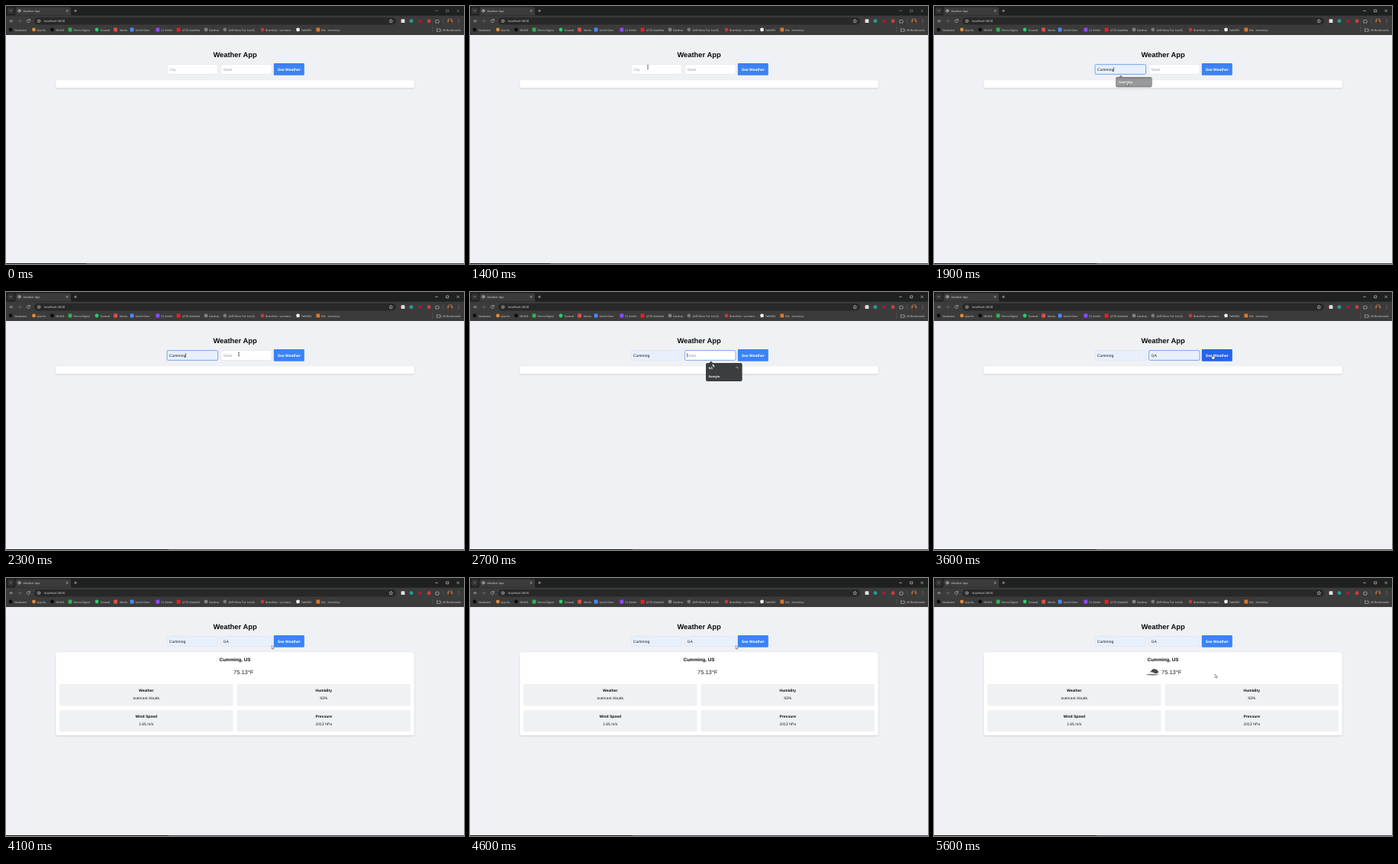
Write an HTML page that moves like this. It is 600 px wide and 338 px high and loops after 5700 ms.

```html
<!DOCTYPE html>
<html lang="en">
<head>
<meta charset="utf-8">
<title>Weather App</title>
<style>
  html, body { margin: 0; width: 100%; height: 100%; overflow: hidden; background: #eff1f4; }
  svg { display: block; width: 600px; height: 338px; text-rendering: geometricPrecision; }
  text { font: 5px "Liberation Sans", Arial, sans-serif; fill: #1b1c1e; }
  .ui text { font: 3.6px "Open Sans", "Noto Sans", sans-serif; fill: #dcdcdc; }
  .mid { text-anchor: middle; }
  .b { font-weight: 700; fill: #0b0b0c; }
  .line { fill: none; stroke: #c9c9c9; stroke-width: .6; stroke-linecap: round; stroke-linejoin: round; }
  .hint { fill: #9ca3af; }
  .card { fill: #fff; filter: drop-shadow(0 1px 1px rgba(0, 0, 0, .13)); }
  .menu text { fill: #f1f1f1; font: 700 3.8px "Open Sans", "Noto Sans", sans-serif; }
</style>
</head>
<body>
<svg viewBox="0 0 600 338">
  <rect width="600" height="338" fill="#eff1f4"/>

  <g class="ui">
    <rect width="600" height="38" fill="#3b3b3b"/>
    <rect width="600" height="12.6" fill="#1f2020"/>
    <rect x="1.7" y="1.8" width="9" height="8.6" rx="2.6" fill="#333"/>
    <path d="M10 12.6q2.5 0 2.5-2.5V4q0-2.5 2.5-2.5h67.500q2.500 0 2.500 2.500v6.100q0 2.500 2.500 2.500z" fill="#3b3b3b"/>
    <text x="22.5" y="7.700">Weather App</text>
    <rect x="37" y="15" width="474" height="9.500" rx="4.700" fill="#282828"/>
    <text x="50" y="21.200" style="font-size:4px">localhost:3000</text>
    <g class="line">
      <path d="M5 5.600l1.200 1.200 1.200-1.200M79 5.200l2.200 2.200m0-2.200l-2.200 2.200M89.300 6.300h3.400m-1.700-1.700v3.400"/>
      <circle cx="17.500" cy="6.300" r="1.800"/>
      <path d="M15.800 6.300h3.400M17.500 4.500q-1.500 1.800 0 3.600q1.500-1.800 0-3.600" stroke-width=".4"/>
      <path d="M9 19.700H5.200m1.800-1.800l-1.800 1.800 1.800 1.800"/>
      <path d="M16.200 19.700h3.800m-1.800-1.800l1.800 1.800-1.800 1.800" stroke="#777"/>
      <path d="M31 18.400a2 2 0 1 0 .4 1.600M31.300 17.300v1.400h-1.400"/>
      <circle cx="43" cy="19.700" r="1.900"/>
      <path d="M43 19.500v1.100m0-2v.1"/>
      <path d="M504.300 17.500l.7 1.500 1.700.2-1.300 1.100.4 1.700-1.500-.9-1.500.9.4-1.700-1.300-1.100 1.700-.2z"/>
      <path d="M563.200 18.500h1.200q.7-1.500 1.300 0h1.300v1.100q1.300.6 0 1.300v1.100h-3.800z"/>
      <path d="M558.500 28v6M572.500 17v5.500" stroke="#666" stroke-width=".5"/>
      <path d="M564.800 29.700h1.500l.6.600h2.400v3h-4.500z"/>
    </g>
    <rect x="517.600" y="17.300" width="4.800" height="4.800" rx=".6" fill="#e6dfe2"/>
    <circle cx="531" cy="19.700" r="2.400" fill="#2c9c8b"/>
    <circle cx="542.500" cy="19.700" r="2.100" fill="#a51f2b"/>
    <rect x="552" y="17.600" width="4.200" height="4.200" rx=".6" fill="#d8383f"/>
    <circle cx="581.700" cy="19.700" r="3.500" fill="#9c6a4c"/>
    <path d="M579.300 22.200q0-2.100 2.400-2.100t2.400 2.100q-2.400 1.800-4.800 0z" fill="#3b2b25"/>
    <circle cx="581.700" cy="18.500" r="1.300" fill="#3b2b25"/>
    <path d="M593 17.700v.1m0 1.900v.1m0 1.900v.1" class="line" stroke-width=".9"/>
    <path id="controls" class="line" d="M562.500 6.300h3M577 4.900h2.800v2.800h-2.800zM590.800 4.900l2.800 2.800m0-2.800l-2.800 2.800"/>
    <g id="marks"></g>
    <text x="572" y="32.500">All Bookmarks</text>
  </g>

  <text class="b mid" x="300" y="67.200" style="font-size:9.375px">Weather App</text>
  <rect id="cityBox" x="211" y="76.600" width="66.500" height="12.800" rx="1.300"/>
  <rect id="stateBox" x="281.500" y="76.600" width="66.500" height="12.800" rx="1.300"/>
  <text id="city" x="213.800" y="84.700"></text>
  <text id="state" x="284.500" y="84.700"></text>
  <path id="cityCaret" d="M235.500 80v5.700" stroke="#111" stroke-width=".5"/>
  <path id="stateCaret" stroke="#111" stroke-width=".5"/>
  <rect id="button" x="350.800" y="75" width="40" height="15.800" rx="1.300"/>
  <text class="b mid" x="370.800" y="84.700" style="fill:#fff">See Weather</text>

  <rect id="card" class="card" x="65.300" y="97.200" width="469.400" rx="2.300"/>
  <g id="report">
    <text class="b mid" x="300" y="108.800" style="font-size:6.250px">Cumming, US</text>
    <text x="298" y="126.300" style="font-size:7.500px">75.13°F</text>
    <g id="cells"></g>
  </g>
  <g id="cloud">
    <path d="M283.500 124q-.8-2 1.300-2.300q.2-2.700 3-2.500q1.700-.9 3 .8q2.300-.2 2.300 1.800q1.700.7.700 2.200l-2.600 1.300q-4-1.200-7.700-1.300z" fill="#47484b"/>
    <path d="M278.500 126.700q0-1.700 2.300-1.800q1.500-2.600 4.400-1.700q2.400-.2 3.200 1.800q3.600-.3 4.800 1.700z" fill="#ededee"/>
    <path d="M278.700 126.700q7-.5 14.800 0q-7 .9-14.800 0z" fill="#333" stroke="#444" stroke-width=".4"/>
  </g>

  <g id="cityMenu" class="menu" transform="translate(-71 0)">
    <path d="M309 95q0-2 2-2h2.500l2.300-2.600 2.300 2.600h36.500q2 0 2 2v9.500q0 2-2 2h-43.600q-2 0-2-2z" fill="#3c3d3f"/>
    <rect id="cityRow" x="309" y="95" width="47.600" height="9.500" fill="#57585a"/>
    <text x="312.500" y="101.200">Cumming</text>
  </g>
  <g id="stateMenu" class="menu">
    <path d="M309 95q0-2 2-2h2.500l2.300-2.600 2.300 2.600h36.500q2 0 2 2v20q0 2-2 2h-43.600q-2 0-2-2z" fill="#3c3d3f"/>
    <rect id="stateRow" x="309" y="95" width="47.600" height="9.500" fill="#57585a"/>
    <text x="312.500" y="101.200">GA</text>
    <text x="312.500" y="111.900">Georgia</text>
    <path class="line" d="M348.500 98.400h2.200v2.200"/>
  </g>

  <rect y="337" width="600" height="1" fill="#4a4542"/>
  <rect id="bar" y="337" height="1" fill="#151515"/>

  <g id="cursor">
    <path id="arrow" d="M0 0v4.600l1.100-1 .8 1.700.8-.4-.8-1.600h1.500z" fill="#fff" stroke="#222" stroke-width=".4"/>
    <path id="beam" d="M-1-2.200h.7l.3.300.300-.3h.7M0-1.900v3.800M-1 2.200h.7l.3-.3.300.3h.7" fill="none" stroke="#111" stroke-width=".6"/>
    <path id="hand" d="M-.5 0q.5-.5 1 0v1.800l2 .5q.5.200.4.800l-.5 2.400h-2.700l-1.600-2.300q.1-.9.900-.4l.5.500z" fill="#fff" stroke="#222" stroke-width=".4"/>
  </g>
</svg>
<script>
const $ = id => document.getElementById(id);
const set = (id, attrs) => { for (const k in attrs) $(id).setAttribute(k, attrs[k]); };
const show = (id, on) => set(id, { opacity: +on });

// icon centre, label start, colour, round, label
const marks = [
  [6, 11, "#0c0c0c", 1, "Studivane"], [36.5, 40.5, "#e88a2c", 1, "Quorla"],
  [60.5, 65, "#0c0c0c", 1, "VELNO"], [84, 88.5, "#2fb457", 0, "Fenno Digest"],
  [119, 123.5, "#1ed760", 1, "Tunavel"], [143.5, 149, "#dd5145", 0, "Mavlo"],
  [165, 169.5, "#4a8af4", 0, "Vorrel Docs"], [198.800, 203, "#9146ff", 0, "(1) Strelm"],
  [226, 231, "#f21c1c", 0, "(273) ViewNok"], [262, 266, "#8b7f86", 1, "Galdora"],
  [286.800, 291.500, "#77797c", 1, "QVR Meta Tier List (8..."], [336, 340, "#c8372f", 1, "BrainOdo - Lerivane..."],
  [382.500, 387, "#f0f0f0", 1, "TalkNRV"], [408.800, 413, "#d9772e", 0, "KVL - Inventory"]
];
$("marks").innerHTML = marks.map(([x, tx, c, round, label]) =>
  `<rect x="${x - 2.4}" y="28.600" width="4.800" height="4.800" rx="${round ? 2.4 : .4}" fill="${c}"/>` +
  `<text x="${tx}" y="32.500" style="font-size:3.500px">${label}</text>`).join("");

const cells = [
  [70, 139, "Weather", "overcast clouds"], [302.5, 139, "Humidity", "93%"],
  [70, 172.800, "Wind Speed", "1.65 m/s"], [302.5, 172.800, "Pressure", "1013 hPa"]
];
$("cells").innerHTML = cells.map(([x, y, name, value]) =>
  `<rect x="${x}" y="${y}" width="227.500" height="28.400" rx="2.300" fill="#eff1f3"/>` +
  `<text class="b mid" x="${x + 113.75}" y="${y + 10}">${name}</text>` +
  `<text class="mid" x="${x + 113.75}" y="${y + 19.9}">${value}</text>`).join("");

// pointer path: tick, x, y
const path = [
  [8, 501, 332], [10, 400, 235], [12, 258, 120], [13, 233.5, 94], [14, 233, 80], [15, 233, 80],
  [16, 235, 86], [17, 246, 97], [18, 252, 100], [19, 252, 100], [20, 270, 91], [21, 290, 84],
  [23, 305, 81.5], [25, 305, 81.5], [28, 324, 100], [29, 325, 100], [31, 325, 100],
  [34, 363, 82], [35, 365, 82.5], [36, 365, 82.5], [37, 356, 85], [38, 349, 88], [39, 348, 88.3],
  [47, 348, 88.3], [51, 367, 125], [52, 368, 126], [57, 368, 126]
];
function pointer(n) {
  const i = path.findIndex(p => p[0] >= n);
  const [t1, x1, y1] = path[i], [t0, x0, y0] = path[Math.max(i - 1, 0)];
  const k = t1 > t0 ? (n - t0) / (t1 - t0) : 1;
  return [x0 + (x1 - x0) * k, y0 + (y1 - y0) * k];
}

function field(name, text, hint, focus) {
  $(name).textContent = text || hint;
  $(name).setAttribute("class", text ? "" : "hint");
  set(name + "Box", {
    fill: text ? "#e8f0fe" : "#fff",
    stroke: focus ? "#5b93ee" : text ? "#d9e0eb" : "#d5d9df",
    "stroke-width": focus ? .8 : .5
  });
}

const LOOP = 5700, STEP = 100;
function draw(time) {
  const n = Math.floor((time % LOOP) / STEP);
  const within = (a, b) => n >= a && n < b;

  const [x, y] = pointer(n);
  const inField = y > 76 && y < 90 && ((x > 211 && x < 277) || (x > 281 && x < 348));
  const onButton = x > 351 && x < 391 && y > 75 && y < 91;
  set("cursor", { transform: `translate(${x} ${y})` });
  show("cursor", n >= 8);
  show("arrow", !inField && !onButton);
  show("beam", inField);
  show("hand", onButton);

  field("city", n >= 18 ? "Cumming" : "", "City", within(15, 24));
  field("state", n >= 28 ? "GA" : "", "State", within(24, 38));
  show("cityCaret", within(19, 24));
  show("stateCaret", within(24, 28) || within(30, 34));
  set("stateCaret", { d: `M${n < 28 ? 284.5 : 292.2} 80v5.700` });
  set("button", { fill: onButton ? "#2563eb" : "#3b82f6" });

  set("cityMenu", { opacity: within(16, 19) ? 1 : n === 19 ? .6 : 0 });
  show("cityRow", n >= 17);
  set("stateMenu", { opacity: within(25, 30) ? 1 : n === 30 ? .6 : 0 });
  show("stateRow", n >= 28);

  set("card", { height: n >= 41 ? 108.8 : 10 });
  show("report", n >= 41);
  show("cloud", n >= 47);

  $("controls").style.stroke = n < 15 ? "#868686" : "#e0e0e0";
  set("bar", { width: n < 15 ? 105 : 213 });
}

const start = performance.now();
function tick() {
  draw(performance.now() - start);
  requestAnimationFrame(tick);
}
tick();
</script>
</body>
</html>
```
